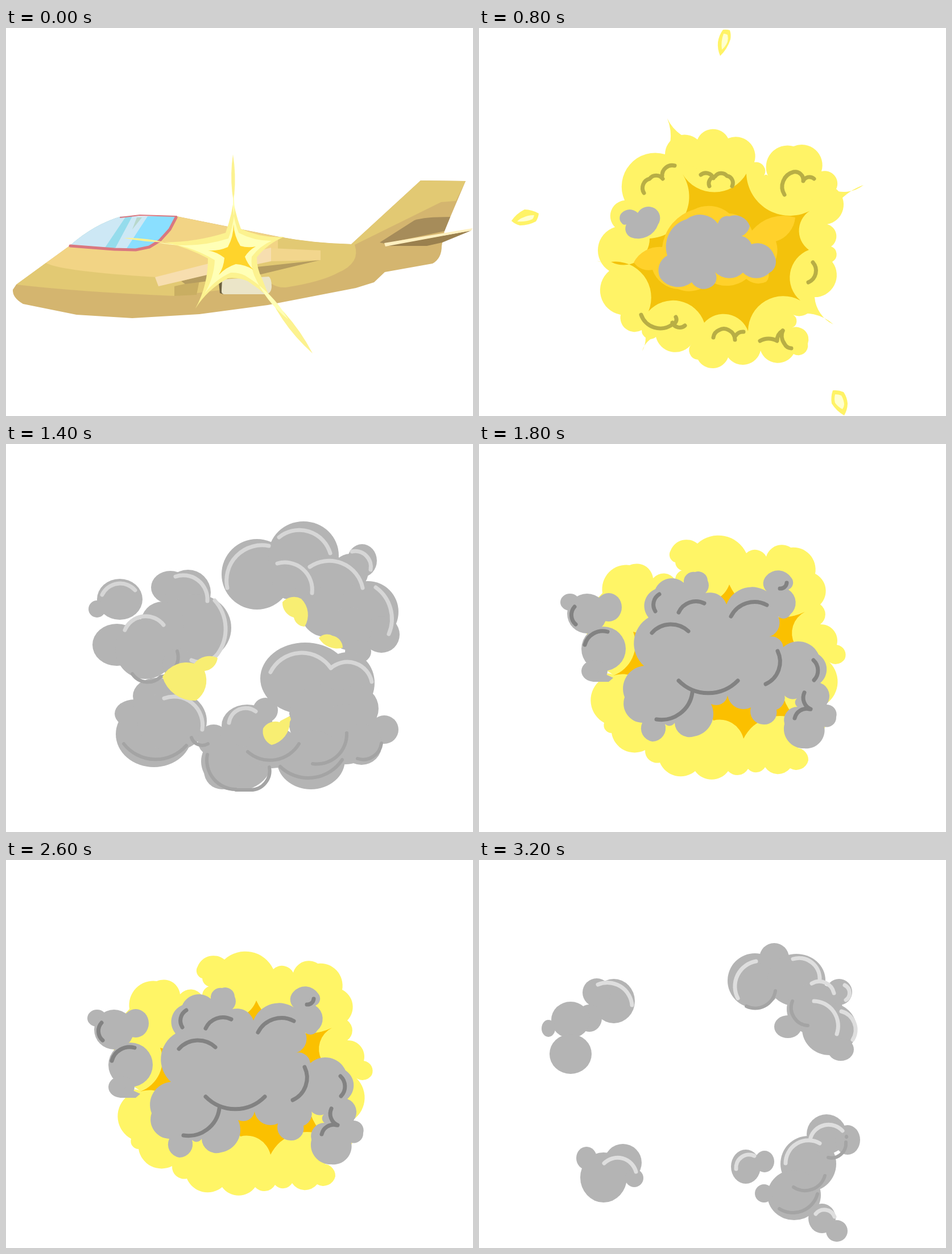
An HTML page with a canvas for the animation above (3.4 s loop, 821 px wide and 682 px high).

```html
<!DOCTYPE html>
<html lang="en">
<head>
<meta charset="utf-8">
<title>Plane explosion</title>
<style>
  html, body { margin: 0; width: 100%; height: 100%; overflow: hidden; background: #fff; }
  canvas { display: block; }
</style>
</head>
<body>
<canvas id="stage" width="821" height="682"></canvas>
<script>
const c = document.getElementById('stage').getContext('2d');
c.lineCap = c.lineJoin = 'round';
const GREY = '#b4b4b4', YELLOW = '#fff366';

// Joins points by arcs of radius |k| * chord: k > 0 bulges out of a
// clockwise outline, k < 0 bulges in, 0 is straight.
function arcs(points, k) {
  const n = points.trim().split(/\s+/).map(Number);
  let d = `M${n[0]} ${n[1]}`;
  for (let i = 2; i < n.length; i += 2) {
    const r = Math.abs(k) * Math.hypot(n[i] - n[i - 2], n[i + 1] - n[i - 1]);
    d += k ? `A${r} ${r} 0 0 ${k > 0 ? 1 : 0} ${n[i]} ${n[i + 1]}` : `L${n[i]} ${n[i + 1]}`;
  }
  return d;
}
function fill(color, d) {
  c.fillStyle = color;
  c.fill(new Path2D(d));
}
// Closed outlines, separated by commas.
function shape(color, k, outlines) {
  for (const o of outlines.split(',')) {
    const [x, y] = o.trim().split(' ');
    fill(color, arcs(`${o} ${x} ${y}`, k));
  }
}
function strokes(color, width, k, lines) {
  c.strokeStyle = color;
  c.lineWidth = width;
  for (const l of lines.split(',')) c.stroke(new Path2D(arcs(l, k)));
}
// Each puff is "x y rx ry"; ry defaults to rx.
function puffs(list) {
  c.fillStyle = GREY;
  for (const puff of list.split(',')) {
    const [x, y, rx, ry = rx] = puff.trim().split(' ').map(Number);
    c.beginPath();
    c.ellipse(x, y, rx, ry, 0, 0, 7);
    c.fill();
  }
}
// Scales a drawing around a point, then shifts it vertically.
function scaled(draw, sx, sy, x, y, dy = 0) {
  c.save();
  c.translate(x, y + dy);
  c.scale(sx, sy);
  c.translate(-x, -y);
  draw();
  c.restore();
}

function plane() {
  fill('#d4b56f', 'M12 460L18 451L113 382Q155 345 203 331H300L480 367Q540 379 607 380L729 268L808 269L771 356L766 383Q766 405 750 414L666 429L647 447L615 457L460 487L340 503L222 510L124 504L30 485Q11 474 12 460Z');
  fill('#e2c973', 'M18 451L70 413L300 360L480 367Q540 378 607 380L729 268L808 269L791 304L765 306L613 381Q624 413 584 430Q555 446 492 456Q477 457 466 449L297 471Q130 464 18 451Z');
  fill('#f2d485', 'M70 413L113 382L203 331H300L478 367V388L390 425L265 438Q100 428 70 413Z');
  shape('#c9ae62', 0, '296 454 340 444 335 469 296 471');
  shape('#b59c5f', 0, '308 445 376 427 552 408 448 433 315 450');
  shape('#f7deaf', 0, '262 438 380 408 466 386 466 410 362 432 268 454');
  shape('#f2d68d', 0, '466 387 553 391 553 408 466 410');
  shape('#6e6240', 0, '374 447 382 442 382 468 376 466');
  fill('#ebe5c8', 'M380 442L462 437Q467 440 467 455Q466 468 455 468H384Q378 468 379 460Z');

  fill('#a68c5a', 'M657 377L718 338Q735 332 781 332L771 357L666 379Z');
  shape('#9a804e', 0, '668 383 818 356 767 377 740 383');
  shape('#fff0c0', 0, '665 378 820 352 818 356 667 384');

  fill('#8adfff', 'M113 382Q155 345 203 331H300Q284 368 252 386Q235 392 113 382Z');
  fill('#cde8f5', 'M113 382Q155 345 203 331H249L211 389Z');
  shape('#95dcec', 0, '211 331 222 331 192 387 174 386');
  shape('#b8d8cc', 0, '230 333 239 333 222 354');
  strokes('#d97880', 5, 0, '113 383 190 389 228 390 252 385 270 374 288 354 299 333');
  strokes('#d97880', 2, 0, '201 333 235 329 300 331');
}

function flash() {
  shape('#fcf28f', -2, '399 222 413 353 489 367 441 403 450 440 539 572 425 445 390 440 333 493 355 405 207 369 386 360');
  shape('#ffffb6', -2, '400 292 409 360 467 374 432 402 436 434 496 512 420 435 395 430 349 467 367 408 265 377 391 370');
  shape('#ffd42b', -2, '400 345 412 383 439 384 420 402 435 425 404 415 374 434 384 404 355 391 390 385');
}

function fireball() {
  shape(YELLOW, .55, '256 303 327 222 384 196 438 194 484 236 501 260 508 260 553 208 602 252 628 283 612 345 619 384 621 411 588 473 552 504 550 527 578 555 553 573 495 567 438 579 385 583 374 555 311 543 286 531 249 504 229 427 239 350');
  shape(YELLOW, -1, '331 159 390 200 400 260 320 240, 676 276 608 355 560 300 620 284, 623 521 550 505 570 450 590 473, 287 568 286 520 330 520 312 542, 207 409 250 405 250 450');
  shape('#f3c20c', -.58, '358 257 470 256 586 319 580 390 565 479 473 533 396 518 298 498 232 411 300 370');
  shape('#ffd12b', .9, '272 412 322 385 378 319 440 326 480 356 556 333 522 375 508 427 505 446 470 441 408 446 350 459 305 425');
  shape(GREY, .7, '319 440 331 400 365 336 420 344 440 331 476 348 448 367 479 380 519 400 511 430 464 430 415 429 408 455 374 447, 251 343 251 325 279 325 309 317 315 345 267 368 259 345');
  strokes('#b8ae45', 7, .62, '290 290 300 265 323 265, 322 260 344 242, 390 258 412 264, 405 278 415 261 436 260 445 278, 537 293 553 253 570 269 589 265, 587 412 579 447, 340 521 285 504, 346 508 340 521, 362 523 340 518');
  strokes('#b8ae45', 7, 1, '412 544 422 531 439 531 450 548, 451 541 465 534, 494 550 524 550 534 532, 549 563 537 555 534 532');
}

function sparks() {
  shape(YELLOW, 2, '429 3 441 4 442 20 424 49 420 25, 57 339 80 319 105 326 100 340 72 347, 622 637 641 640 648 660 642 681 620 660');
  shape('#ffffd0', 2, '430 10 437 12 437 24 427 38, 67 340 78 333 97 329 94 336, 626 644 637 646 642 662 639 670 626 659');
}

function glow() {
  shape('#fff566', .62, '217 262 265 213 306 236 345 239 366 222 345 208 337 187 384 175 470 192 505 198 548 182 591 228 600 282 600 317 629 353 643 378 612 380 610 457 553 535 579 556 547 570 503 568 473 571 438 575 380 575 318 560 292 538 233 508 220 490 210 418 235 405');
}

function burst() {
  glow();
  shape('#fbc000', -.7, '440 247 573 295 555 352 562 486 465 518 412 486 300 440 236 407 271 330 380 275');
  puffs('160 278 17 15, 190 298 35, 228 287 23 25, 219 360 39, 203 399 23 19');
  shape(GREY, 0, '210 399 236 411 228 418 200 418');
  shape(GREY, .62, '298 305 310 255 360 244 380 225 402 240 388 267 435 282 510 262 505 232 549 235 544 256 547 300 526 303 506 340 535 357 597 370 600 420 611 458 628 480 607 497 572 535 537 492 560 462 559 447 533 432 523 467 500 493 478 463 437 442 408 457 378 514 344 490 327 492 305 523 287 490 256 445 290 390');
  strokes('#828282', 7, .7, '170 317 168 286, 186 353 226 330, 310 294 317 264, 304 332 368 329, 351 296 396 280, 443 303 506 283, 541 244 529 254, 455 416 351 416, 375 437 312 484, 525 364 504 422, 588 380 589 415, 583 466 572 437, 555 482 581 466');
}

function clouds() {
  puffs('441 229 62, 523 196 62 60, 503 245 35 29, 572 262 64, 626 205 26 29, 605 225 32, 636 295 54, 660 335 32, 562 295 44, 605 325 38, 619 365 23 20');
  puffs('200 273 40 36, 160 290 15, 289 252 34 29, 320 261 40, 334 323 62 59, 275 315 38, 195 353 43 37, 245 360 53, 303 387 28');
  puffs('264 443 41 32, 226 474 35 25, 260 510 67 58, 292 487 61 53, 365 521 28, 405 558 62 52, 380 575 32, 424 495 45 37, 456 468 22, 468 533 45 37');
  puffs('526 412 79 63, 600 420 48 54, 615 465 40, 550 485 53 62, 597 510 53, 536 555 60 52, 665 502 25, 625 528 36');
  strokes('#a4a4a4', 6, .65, '301 364 272 409 222 404, 317 530 207 527, 355 527 326 516, 463 568 430 608, 404 607 354 546, 515 527 425 541, 599 508 539 562, 591 555 482 567, 660 526 618 553');
  strokes('#a4a4a4', 6, 0, '404 608 430 608');
  strokes('#d6d6d6', 7, .6, '389 253 462 179, 480 164 570 192, 477 210 538 262, 534 216 627 253, 608 189 641 221, 169 265 227 257, 298 233 354 276');
  strokes('#d6d6d6', 7, .58, '209 327 277 318, 278 447 345 502, 392 490 439 470, 465 401 571 394 643 418');
  strokes('#d6d6d6', 7, .8, '650 252 673 334, 367 275 372 369 326 380');
}

function embers() {
  shape('#f8ee72', .8, '486 278 519 272 525 321 506 305, 550 341 574 337 592 358, 275 409 331 386 372 376 349 399 334 451, 452 500 481 489 499 479 499 488 467 529');
  shape('#fff', 0, '478 469 497 472 499 478 480 488');
}

function smoke() {
  clouds();
  embers();
}

function thickSmoke() {
  scaled(glow, .88, .88, 415, 385);
  shape('#fff', .7, '390 345 432 320 466 345 462 385 432 424 394 395');
  scaled(clouds, 1, .981, 418, 374, 4);
}

function wisps() {
  puffs('237 248 37 39, 207 233 25, 194 278 22 24, 161 281 34 32, 122 296 12 15, 161 341 37 35');
  puffs('485 212 48, 519 172 26, 558 211 51 46, 633 232 23, 590 262 49 45, 616 297 48 46, 543 293 24 20, 636 333 23 20');
  puffs('189 524 18 20, 219 558 41 44, 253 532 33, 273 559 16');
  puffs('469 539 26 30, 502 530 17 19, 579 534 49, 611 482 35, 648 492 22 26, 554 589 47 44, 501 586 16, 603 630 24 26, 629 652 19');
  strokes('#a4a4a4', 6, .62, '521 230 470 257, 578 291 551 248, 608 555 553 575, 645 496 614 523, 646 486 646 487, 595 587 528 613');
  strokes('#dedede', 7, .62, '209 219 269 255, 455 243 487 178, 552 174 599 209, 585 217 624 234, 589 248 629 306, 637 266 657 316');
  strokes('#dedede', 7, .58, '643 220 645 246, 220 533 276 548, 452 543 484 520, 539 533 599 498, 583 488 639 476, 592 622 625 627');
}

function spreadingFlash() {
  plane();
  scaled(flash, 1.36, 1.36, 402, 393, -12.5);
}
function ignition() {
  plane();
  scaled(flash, 1.55, 1.566, 402, 393, -38);
  scaled(fireball, .5, .5, 412, 390);
}
function swelling() {
  plane();
  scaled(fireball, .8, .8, 415, 390);
  scaled(sparks, .96, .96, 360, 341, -1.5);
}
function explosion() {
  fireball();
  sparks();
}

const cycle = [explosion, burst, thickSmoke, smoke];
const intro = [() => { plane(); flash(); }, spreadingFlash, ignition, swelling];
const scenes = [...intro, ...cycle, ...cycle, ...cycle, wisps];
const STEP = 200;

const start = performance.now();
function tick() {
  const time = Math.max(0, performance.now() - start);
  c.clearRect(0, 0, 821, 682);
  scenes[Math.floor(time / STEP) % scenes.length]();
  requestAnimationFrame(tick);
}
tick();
</script>
</body>
</html>
```
